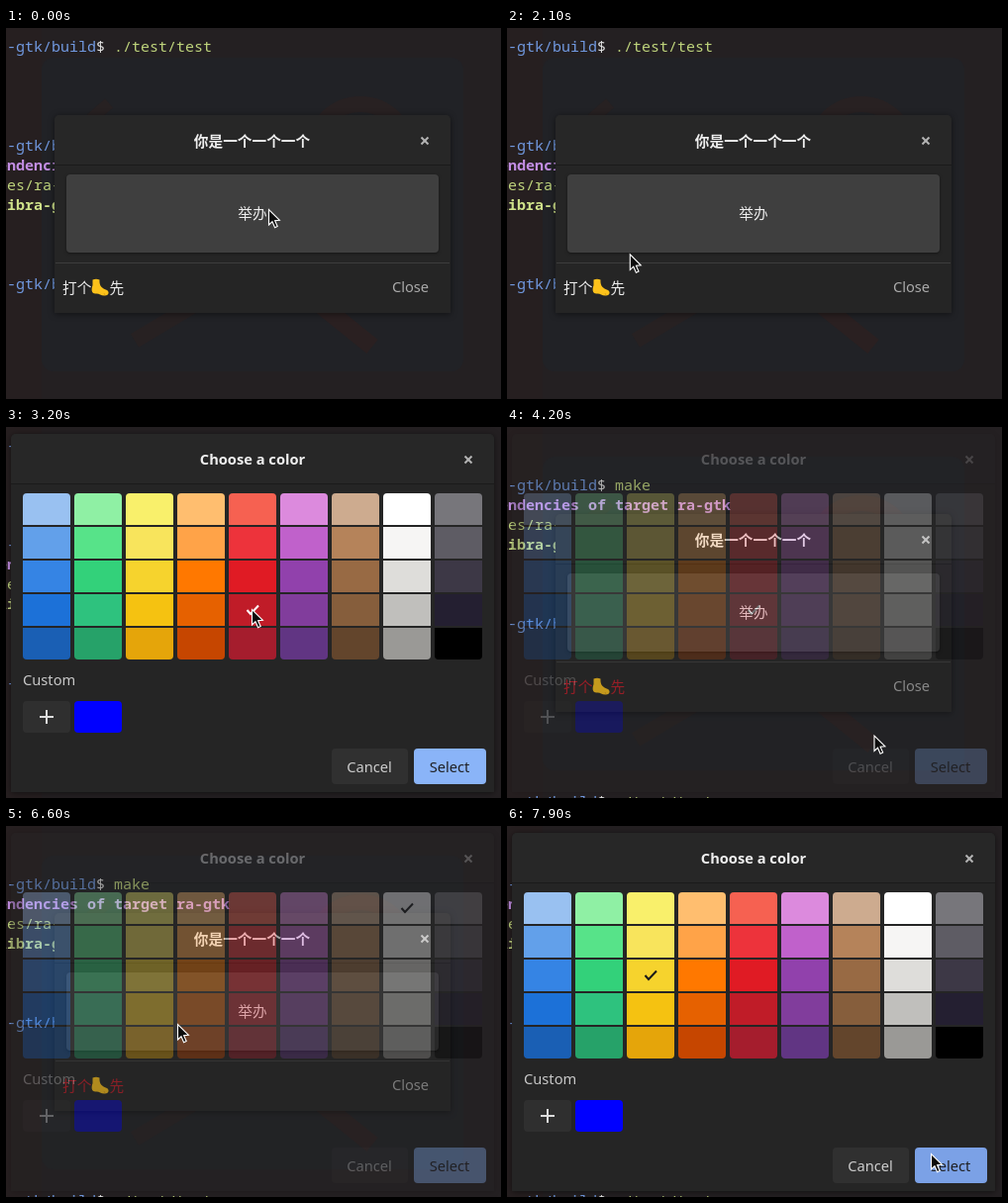
Recreate the animation shown at these times as an HTML page with a canvas. Size 500 by 375 pixels, loop 8 s.

```html
<!DOCTYPE html>
<html lang="en">
<head>
<meta charset="utf-8">
<title>Color chooser</title>
<style>
html, body { margin: 0; width: 100%; height: 100%; overflow: hidden; background: #242022; }
canvas { display: block; width: 500px; height: 375px; }
</style>
</head>
<body>
<canvas id="stage" width="500" height="375"></canvas>
<script>
const ctx = document.getElementById('stage').getContext('2d');
const LOOP = 8000, STEP = 100;
const UI = '14.67px "Noto Sans", "Noto Sans CJK SC", sans-serif';
const MONO = '15px "Noto Sans Mono", monospace';
const BLUE = '#7199e0', GREEN = '#bfd47c', PURPLE = '#c38ee4', RED = '#c01c28';

// One row of shades per hue, light to dark.
const PALETTE = [
  '99c1f1 62a0ea 3584e4 1c71d8 1a5fb4',
  '8ff0a4 57e389 33d17a 2ec27e 26a269',
  'f9f06b f8e45c f6d32d f5c211 e5a50a',
  'ffbe6f ffa348 ff7800 e66100 c64600',
  'f66151 ed333b e01b24 c01c28 a51d2d',
  'dc8add c061cb 9141ac 813d9c 613583',
  'cdab8f b5835a 986a44 865e3c 63452c',
  'ffffff f6f5f4 deddda c0bfbc 9a9996',
  '77767b 5e5c64 3d3846 241f31 000000'
].map(hue => hue.split(' ').map(hex => '#' + hex));

// Pointer path: time, x, y.
const PATH = [
  [200, 265, 183], [700, 222, 222], [1100, 131, 258], [1200, 105, 260],
  [1450, 60, 262], [1700, 62, 262], [1800, 62, 262], [2300, 165, 206],
  [2700, 173, 203], [3100, 246, 183], [3200, 248, 184], [3600, 300, 214],
  [3900, 428, 335], [4100, 428, 335], [4500, 198, 241], [4900, 90, 258],
  [5100, 56, 261], [5400, 66, 261], [5500, 66, 261], [6300, 174, 202],
  [6600, 173, 200], [7200, 173, 200], [7500, 136, 148], [7600, 138, 150],
  [7900, 428, 331]
];

const ramp = (t, a, b) => Math.min(1, Math.max(0, (t - a) / (b - a)));

function pointerAt(t) {
  const i = PATH.findIndex(p => p[0] > t);
  if (i === 0) return PATH[0].slice(1);
  if (i < 0) return PATH[PATH.length - 1].slice(1);
  const [t0, x0, y0] = PATH[i - 1], [t1, x1, y1] = PATH[i];
  const k = ramp(t, t0, t1);
  return [x0 + (x1 - x0) * k, y0 + (y1 - y0) * k];
}

function box(x, y, w, h, color, radius = 0) {
  ctx.fillStyle = color;
  ctx.beginPath();
  ctx.roundRect(x, y, w, h, radius);
  ctx.fill();
}

function label(text, x, y, color, align = 'left', weight = '') {
  ctx.font = weight + ' ' + UI;
  ctx.textAlign = align;
  ctx.fillStyle = color;
  ctx.fillText(text, x, y + 5.4);
}

function line(points, color, width) {
  ctx.strokeStyle = color;
  ctx.lineWidth = width;
  ctx.beginPath();
  points.forEach(([x, y]) => ctx.lineTo(x, y));
  ctx.stroke();
}

function cross(x, y, color) {
  line([[x - 3.5, y - 3.5], [x + 3.5, y + 3.5]], color, 2);
  line([[x + 3.5, y - 3.5], [x - 3.5, y + 3.5]], color, 2);
}

function wallpaper() {
  box(0, 0, 500, 375, '#242022');
  box(0, 0, 36, 375, '#261f20');
  box(36, 30, 426, 317, '#212226', 12);
  ctx.strokeStyle = '#282122';
  ctx.lineWidth = 16;
  ctx.beginPath();
  ctx.arc(358, 125, 48, 0, Math.PI * 2);
  ctx.stroke();
  line([[318, 280], [370, 322]], '#2a2021', 18);
  line([[130, 316], [190, 280]], '#272122', 16);
  line([[86, 92], [104, 76]], '#272122', 12);
}

function termLine(y, parts) {
  let x = -8;
  ctx.textAlign = 'left';
  for (const [text, color, weight = '300'] of parts) {
    ctx.font = weight + ' ' + MONO;
    ctx.fillStyle = color;
    ctx.fillText(text, x, y + 5.5);
    x += text.length * 9;
  }
}

function terminal(scroll) {
  const prompt = (y, command) => termLine(y - scroll, [
    ['a-gtk/build', BLUE], ['$ ', '#e4e4e4'], [command, GREEN]
  ]);
  prompt(18, './test/test');
  prompt(118, 'make');
  termLine(138 - scroll, [['endencies of target ra-gtk', PURPLE, 'bold']]);
  termLine(158 - scroll, [['tes/ra-', GREEN]]);
  termLine(178 - scroll, [['libra-g', '#cfe28a', 'bold']]);
  prompt(258, '');
  prompt(438, './test/test');
}

function windowFrame(x, y, w, h) {
  ctx.save();
  ctx.shadowColor = 'rgba(0,0,0,.5)';
  ctx.shadowBlur = 6;
  ctx.shadowOffsetY = 1;
  box(x, y, w, h, '#252525', [5, 5, 0, 0]);
  ctx.restore();
  box(x, y, w, 50, '#272727', [5, 5, 0, 0]);
  box(x, y + 50, w, 1, '#1a1a1a');
}

function foot() {
  ctx.fillStyle = '#fcc21b';
  ctx.beginPath();
  ctx.moveTo(87.5, 254.5);
  ctx.quadraticCurveTo(91, 253, 94.5, 254.5);
  ctx.bezierCurveTo(94, 261, 97, 263, 102, 265);
  ctx.bezierCurveTo(105, 267, 103.5, 270.5, 100, 270.5);
  ctx.bezierCurveTo(96, 271, 94, 268, 91, 268.5);
  ctx.bezierCurveTo(86, 269, 86, 264, 87.5, 260);
  ctx.fill();
  line([[99, 268], [100, 270]], '#d99a12', 0.8);
}

function mainDialog(textColor) {
  windowFrame(49, 88, 400, 200);
  label('你是一个一个一个', 248.5, 115, '#eeeeee', 'center', 'bold');
  cross(423, 114, '#b4b4b4');
  ctx.save();
  ctx.shadowColor = 'rgba(0,0,0,.45)';
  ctx.shadowBlur = 3;
  ctx.shadowOffsetY = 1;
  box(61, 148, 376, 79, '#3f3f3f', 4);
  ctx.restore();
  label('举办', 249, 188, '#eeeeee', 'center');
  box(50, 237, 398, 1, '#3d3d3d');
  label('打个', 57, 263, textColor);
  foot();
  label('先', 104.5, 263, textColor);
  label('Close', 408.5, 262, '#aaaaaa', 'center');
}

function pushButton(text, x, w, color, ink) {
  box(x, 325, w, 36, color, 4);
  label(text, x + w / 2 - 0.5, 344, ink, 'center');
}

function chooser(col, row, hover) {
  windowFrame(5, 7, 488, 362);
  label('Choose a color', 249, 33, '#eeeeee', 'center', 'bold');
  cross(467, 33, '#b4b4b4');
  PALETTE.forEach((hue, i) => hue.forEach((color, j) => {
    const top = j === 0 ? 4 : 0, bottom = j === 4 ? 4 : 0;
    box(17 + 52 * i, 67 + 34 * j, 48, 32, color, [top, top, bottom, bottom]);
  }));
  const cx = 41 + 52 * col, cy = 83 + 34 * row;
  line([[cx - 5.5, cy], [cx - 2, cy + 4], [cx + 6, cy - 4.5]], col === 4 ? '#ffffff' : '#1a1a1a', 2);
  label('Custom', 17, 256, '#c8c8c8');
  box(17, 277, 48, 32, '#2f2f2f', 4);
  line([[34, 293], [48, 293]], '#dddddd', 2);
  line([[41, 286], [41, 300]], '#dddddd', 2);
  box(69, 277, 48, 32, '#0000ff', 4);
  pushButton('Cancel', 329, 77, '#303030', '#cccccc');
  pushButton('Select', 412, 73, hover ? '#7ba1e6' : '#8ab4f8', '#202124');
}

function pointer(x, y) {
  ctx.save();
  ctx.translate(x, y);
  ctx.beginPath();
  [[0.5, 0.5], [0.5, 16], [4, 12.8], [6.6, 18.8], [9.2, 17.6], [6.6, 11.8], [11.4, 11.4]]
    .forEach(([px, py]) => ctx.lineTo(px, py));
  ctx.closePath();
  ctx.fillStyle = '#0c0c0c';
  ctx.fill();
  ctx.strokeStyle = '#ffffff';
  ctx.lineWidth = 1.1;
  ctx.stroke();
  ctx.restore();
}

function draw(t) {
  const [px, py] = pointerAt(t);
  const picked = t >= 4100;
  wallpaper();
  terminal(picked ? 60 : 0);
  mainDialog(picked ? RED : '#eeeeee');

  const alpha = t < 5000
    ? ramp(t, 2210, 2410) * (1 - ramp(t, 4050, 4250))
    : ramp(t, 6530, 6730);
  if (alpha > 0) {
    // Fade the chooser as one layer.
    const under = ctx.getImageData(0, 0, 500, 375);
    chooserLayer(t, px, py, alpha, under);
  }
  pointer(px, py);
}

const layer = document.createElement('canvas');
layer.width = 500;
layer.height = 375;
const layerCtx = layer.getContext('2d');

function chooserLayer(t, px, py, alpha, under) {
  const [col, row] = t >= 7500 ? [2, 2] : t >= 3100 && t < 5000 ? [4, 3] : [7, 0];
  const hover = px >= 412 && px < 485 && py >= 325 && py < 361;
  ctx.clearRect(0, 0, 500, 375);
  chooser(col, row, hover);
  layerCtx.clearRect(0, 0, 500, 375);
  layerCtx.drawImage(ctx.canvas, 0, 0);
  ctx.putImageData(under, 0, 0);
  ctx.globalAlpha = alpha;
  ctx.drawImage(layer, 0, 0);
  ctx.globalAlpha = 1;
}

const start = performance.now();
function tick() {
  const t = (performance.now() - start) % LOOP;
  draw(Math.floor(t / STEP) * STEP);
  requestAnimationFrame(tick);
}
tick();
</script>
</body>
</html>
```
